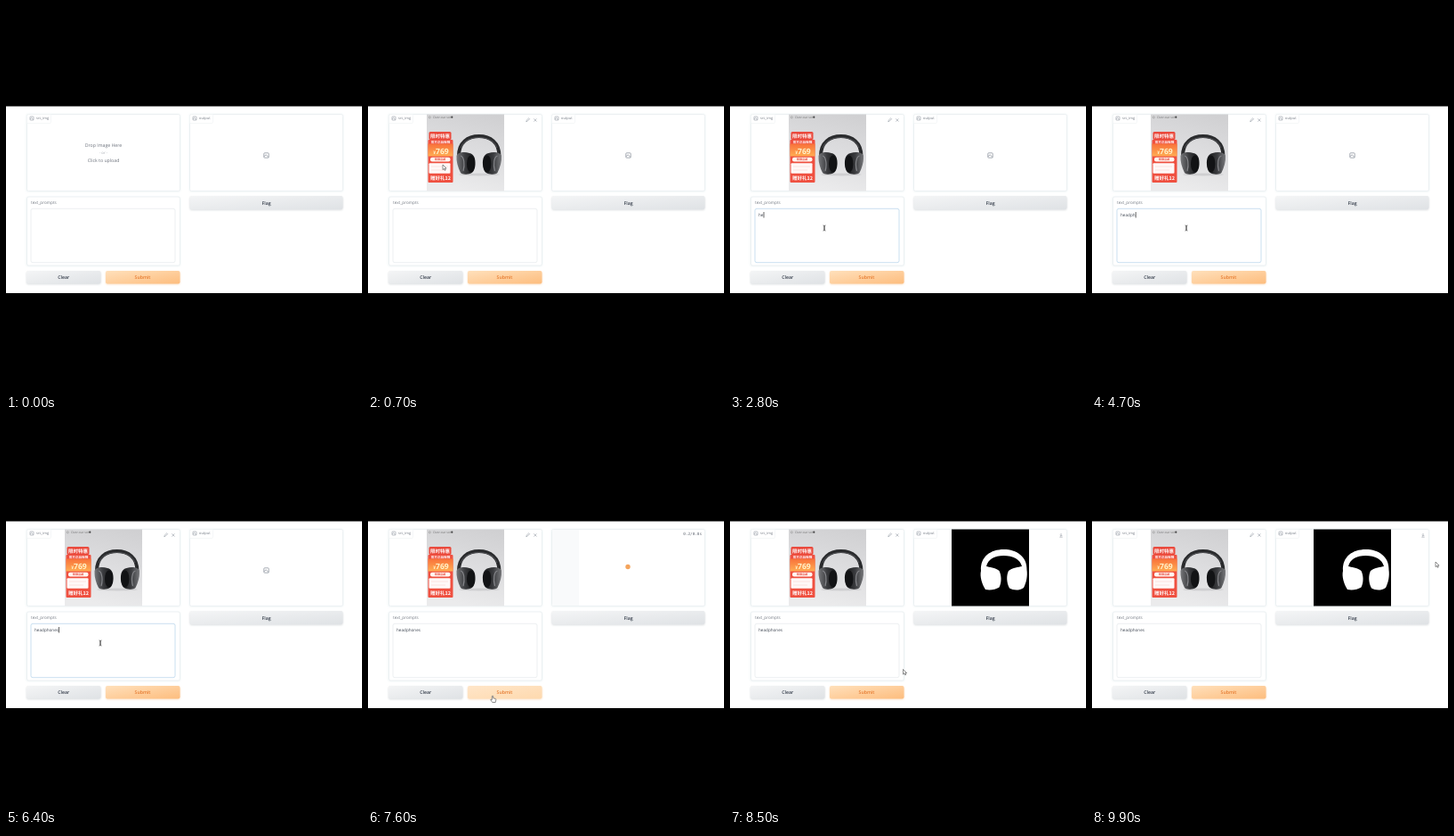
These frames come from a looping animation (400x434 px, 10000 ms). An HTML page:

```html
<!DOCTYPE html>
<html lang="en">
<head>
<meta charset="utf-8">
<title>Image segmentation demo</title>
<style>
  html, body { margin: 0; width: 100%; height: 100%; overflow: hidden; background: #000; }
  svg { display: block; width: 400px; height: 434px; }
  text { font-family: "Open Sans", "Noto Sans", sans-serif; font-size: 4.65px; fill: #3f4652; text-rendering: geometricPrecision; white-space: pre; }
  .mid { text-anchor: middle; }
  .label { font-size: 4px; fill: #747a84; }
  .hint { font-size: 5.2px; fill: #6b717b; }
  .btn { font-size: 5.2px; font-weight: 600; fill: #303846; }
  .cn { font-family: "Noto Sans CJK SC", "Noto Sans CJK", sans-serif; font-weight: 700; fill: #fff; }
  .card { fill: #fff; stroke: #e9eef0; stroke-width: .8; }
  .tab { fill: #fff; stroke: #eff2f4; stroke-width: .6; }
  .icon { fill: none; stroke: #9299a3; stroke-width: .6; }
</style>
</head>
<body>
<svg viewBox="0 0 400 434">
  <defs>
    <filter id="soft" filterUnits="userSpaceOnUse" x="0" y="105" width="400" height="224"><feGaussianBlur stdDeviation=".7"/></filter>
    <filter id="shade" x="-10%" y="-30%" width="120%" height="170%"><feGaussianBlur stdDeviation="1"/></filter>
    <linearGradient id="gray" x2="1" y2="1"><stop stop-color="#f4f5f6"/><stop offset="1" stop-color="#dfe2e5"/></linearGradient>
    <linearGradient id="orange" x2="1" y2="1"><stop stop-color="#ffe0bb"/><stop offset="1" stop-color="#fdbd7e"/></linearGradient>
    <linearGradient id="pale" x2="1" y2="1"><stop stop-color="#ffe6c9"/><stop offset="1" stop-color="#fed9ae"/></linearGradient>
    <linearGradient id="wall" x1=".8" y1="0" x2=".55" y2="1"><stop stop-color="#d0d0d2"/><stop offset=".5" stop-color="#dddddf"/><stop offset="1" stop-color="#ebebec"/></linearGradient>
    <linearGradient id="price" x2="0" y2="1"><stop stop-color="#f8703a"/><stop offset="1" stop-color="#ffad52"/></linearGradient>
    <linearGradient id="cup" x2="1"><stop stop-color="#77787b"/><stop offset=".45" stop-color="#3a3b3e"/><stop offset="1" stop-color="#131416"/></linearGradient>
    <clipPath id="page"><rect y="112.5" width="400" height="209.5"/></clipPath>
    <path id="phones" d="M282 168C281 152 293 144 307.5 144C322 144 334 152 333.5 167C334.5 174 333 181 330 187C324 191 318 189.5 314 187.5C310.5 181 310.5 173 313 168C318 164 324 164 328 163C326 155 318 151 307.5 151C297 151 290 155 288 163C291 164 298 164 302.5 168C305 173 305.5 181 302.5 186.5C298 189 293 190 287 189C283 183 280.5 174 282 168Z"/>
    <g id="ear">
      <path d="M99.5 168C101 164 108 163 114 165C119 166 121 171 120.500 178C120 185 117 188.500 112 188.500C108 189 105.500 188.500 104 187C101 181 99 174 99.500 168Z" fill="url(#cup)"/>
      <ellipse cx="115.500" cy="177" rx="4.500" ry="9.500" fill="#121315"/>
      <path d="M104 168C108 169 109 178 107 185" fill="none" stroke="#85868a" stroke-width="1.200"/>
    </g>
    <g id="frame" class="icon"><rect x="-2" y="-2" width="4" height="4" rx=".6"/><path d="M-2 1L-.3 -.5L2 1.6"/></g>
  </defs>

  <rect y="112.5" width="400" height="209.5" fill="#fff"/>
  <g clip-path="url(#page)"><g filter="url(#soft)">
    <g filter="url(#shade)" fill="#eff5f6">
      <rect x="22.5" y="121" width="173.5" height="87.5" rx="2"/>
      <rect x="206" y="121" width="173" height="87.5" rx="2"/>
      <rect x="22.5" y="214" width="173.5" height="78" rx="2"/>
      <g fill="#dcdfe1">
        <rect x="23" y="298" width="83.5" height="14.3" rx="2"/>
        <rect x="112" y="298" width="83.5" height="14.3" rx="2" fill="#f9dfc4"/>
        <rect x="206.5" y="214" width="172" height="15" rx="2"/>
      </g>
    </g>
    <rect class="card" x="23.5" y="121.5" width="172" height="86" rx="2"/>
    <rect class="card" x="206.5" y="121.5" width="172" height="86" rx="2"/>
    <rect class="card" x="23.5" y="214" width="172" height="77" rx="2"/>

    <g id="drop" class="mid">
      <text class="hint" x="109.5" y="157.7">Drop Image Here</text>
      <text class="hint" x="109.5" y="166" style="font-size:4.2px;fill:#a6abb2">- or -</text>
      <text class="hint" x="109.5" y="175">Click to upload</text>
    </g>

    <g id="photo">
      <rect x="66" y="121.5" width="87" height="86" fill="url(#wall)"/>
      <circle cx="69.3" cy="124.8" r="1.1" fill="none" stroke="#888" stroke-width=".5"/>
      <text x="73" y="126.2" style="font-size:3.5px;fill:#777">Over-ear set</text>
      <circle cx="94.3" cy="124.7" r="1.1" fill="#444"/>
      <ellipse cx="125" cy="189" rx="23" ry="1.5" fill="#cfcfd1"/>
      <path d="M102 168C102 153 112 146 124.700 146S147.400 153 147.400 168" fill="none" stroke="#2a2b2d" stroke-width="4"/>
      <path d="M104.500 159C107 151 115 147.500 124.700 147.500S142.500 151 145 159" fill="none" stroke="#505155" stroke-width="1"/>
      <use href="#ear"/>
      <use href="#ear" transform="matrix(-1 0 0 1 249.500 0)"/>
      <g>
        <rect x="68.500" y="141" width="25" height="9" rx="1.500" fill="#ea4a3d"/>
        <text class="cn mid" x="81" y="147.600" style="font-size:5.500px">限时特惠</text>
        <rect x="67.500" y="150" width="28" height="48" rx="1" fill="#ef5040"/>
        <text class="cn mid" x="81.500" y="153.700" style="font-size:3.600px">官方正品保障</text>
        <rect x="67.500" y="154.500" width="28" height="14" fill="url(#price)"/>
        <text class="mid" x="82" y="166" style="font-size:8.600px;font-weight:700;fill:#fff4cc"><tspan style="font-size:5px">¥</tspan>769</text>
        <rect x="70" y="169.800" width="22.500" height="4.800" rx="2" fill="#fff6f1"/>
        <text class="cn mid" x="81" y="173.400" style="font-size:3.100px;fill:#e5453a">领券立减</text>
        <rect x="68.500" y="176.300" width="24" height="11.500" rx="1" fill="#fff8f7"/>
        <path d="M71 180H90M71 184H87" stroke="#fbe3e0" stroke-width="1"/>
        <text class="cn mid" x="81.500" y="195" style="font-size:5.500px">赠好礼12</text>
      </g>
      <path class="icon" d="M177.700 129.700L178.100 128.300L180.700 125.800L181.600 126.700L179 129.300ZM186.300 126.400L189.500 129.500M189.500 126.400L186.300 129.500"/>
    </g>

    <path d="M23.500 131.500V123.500Q23.500 121.500 25.500 121.500H50.500V130Q50.500 131.500 49 131.500Z" class="tab"/>
    <use href="#frame" x="29" y="126"/>
    <text class="label" x="34" y="127.400">src_img</text>

    <g id="mask">
      <rect x="249" y="121.500" width="87" height="86" fill="#000"/>
      <use href="#phones" fill="#fff"/>
      <path class="icon" d="M372 126V129M370.700 128L372 129.300L373.300 128M370.300 130.200H373.700"/>
    </g>
    <use id="blank" href="#frame" transform="translate(292.500 167.500) scale(1.350)"/>
    <g id="outLabel">
      <path d="M206.500 131.500V123.500Q206.500 121.500 208.500 121.500H232.500V130Q232.500 131.500 231 131.500Z" class="tab"/>
      <use href="#frame" x="212" y="126"/>
      <text class="label" x="217" y="127.400">output</text>
    </g>
    <g id="busy">
      <rect id="bar" x="207" y="122" height="85" fill="#f9fafb"/>
      <circle cx="292" cy="163.500" r="2.700" fill="#f4a45c"/>
      <text id="timer" x="375" y="127.500" text-anchor="end" style="font-family:'DejaVu Sans Mono',monospace;font-size:4.300px;fill:#5c636e"></text>
    </g>

    <text x="28" y="222" style="fill:#747a84">text_prompts</text>
    <rect id="area" x="28" y="227.300" width="162" height="60.400" rx="2" fill="#fff" stroke-width=".8"/>
    <text id="typed" x="32" y="235.800"></text>
    <rect id="caret" y="231" width=".7" height="6.500" fill="#222"/>

    <rect x="23" y="297" width="83.500" height="14.500" rx="2" fill="url(#gray)"/>
    <rect id="submit" x="112" y="297" width="83.500" height="14.500" rx="2"/>
    <rect x="206.500" y="213" width="172" height="15" rx="2" fill="url(#gray)"/>
    <g class="mid">
      <text class="btn" x="64.700" y="306.100">Clear</text>
      <text class="btn" x="153.500" y="306.100" style="fill:#e57b30">Submit</text>
      <text class="btn" x="292.500" y="222.500">Flag</text>
    </g>

    <g id="arrow"><path d="M0 0V5.600L1.400 4.400L2.300 6.400L3.200 6L2.400 4.100H4.100Z" fill="#fff" stroke="#444" stroke-width=".6"/></g>
    <g id="beam"><path d="M-1.400 -3Q0 -3 0 -2V2Q0 3 -1.400 3M1.400 -3Q0 -3 0 -2V2Q0 3 1.400 3" fill="none" stroke="#444" stroke-width=".8"/></g>
    <g id="hand"><path d="M-.7 .6Q0 -.4 .7 .6V2.900L3.200 3.400Q4 3.700 3.800 4.700L3.200 7.500H-.3L-2.300 4.700Q-2.300 3.700 -.7 4.700Z" fill="#fff" stroke="#444" stroke-width=".6"/></g>
  </g></g>
</svg>
<script>
const $ = id => document.getElementById(id);
const LOOP = 10000, STEP = 100;
const word = 'headphones';
const keyTimes = [2600, 2800, 3000, 3200, 4300, 4700, 4900, 5100, 5200, 5300];
const caretSpans = [[1300, 1700], [2300, 3700], [4100, 5900], [6400, 6900]];
// time, x, y of the pointer
const path = [
  [500, 79, 166], [700, 84, 178], [1000, 97, 224], [1300, 106, 249],
  [6600, 106, 249], [6900, 127, 290], [7100, 140, 308],
  [8000, 140, 308], [8200, 140, 303], [8300, 140, 303],
  [8500, 194.5, 278.5], [8700, 209.5, 278.5], [8800, 209.5, 278.5],
  [9000, 207, 276], [9200, 228.5, 275.5], [9300, 228.5, 275.5],
  [9600, 348, 185.5], [9700, 348, 185.5], [9900, 386, 158]
];

const within = (t, a, b) => t >= a && t < b;
const show = (id, on) => $(id).setAttribute('display', on ? 'inline' : 'none');

function pointer(t) {
  let i = path.findIndex(p => p[0] > t);
  if (i < 0) i = path.length;
  const a = path[Math.max(0, i - 1)], b = path[i] || a;
  const k = b[0] > a[0] ? (t - a[0]) / (b[0] - a[0]) : 0;
  return [a[1] + (b[1] - a[1]) * k, a[2] + (b[2] - a[2]) * k];
}

function draw(now) {
  const t = Math.floor((now % LOOP) / STEP) * STEP;
  const loaded = t >= 500, busy = within(t, 7500, 7800), done = t >= 7800;
  show('drop', !loaded);
  show('photo', loaded);
  show('mask', done);
  show('blank', !busy && !done);
  show('outLabel', !busy);
  show('busy', busy);
  const early = t < 7600;
  $('bar').setAttribute('width', early ? 14 : 30);
  $('timer').textContent = early ? '0.1/0.8s' : '0.2/0.8s';

  $('area').setAttribute('stroke', within(t, 1300, 7500) ? '#bcd7ec' : '#e8ebee');
  $('typed').textContent = word.slice(0, keyTimes.filter(k => k <= t).length);
  show('caret', caretSpans.some(([a, b]) => within(t, a, b)));
  $('caret').setAttribute('x', 32.2 + $('typed').getComputedTextLength());
  $('submit').setAttribute('fill', within(t, 7000, 8400) ? 'url(#pale)' : 'url(#orange)');

  const [x, y] = pointer(t);
  const inArea = x > 28 && x < 190 && y > 227 && y < 288;
  const kind = within(t, 7000, 8400) ? 'hand' : inArea ? 'beam' : 'arrow';
  for (const id of ['arrow', 'beam', 'hand']) {
    show(id, loaded && id === kind);
    $(id).setAttribute('transform', `translate(${x} ${y})`);
  }
}

function tick() {
  draw(performance.now());
  requestAnimationFrame(tick);
}
tick();
</script>
</body>
</html>
```
